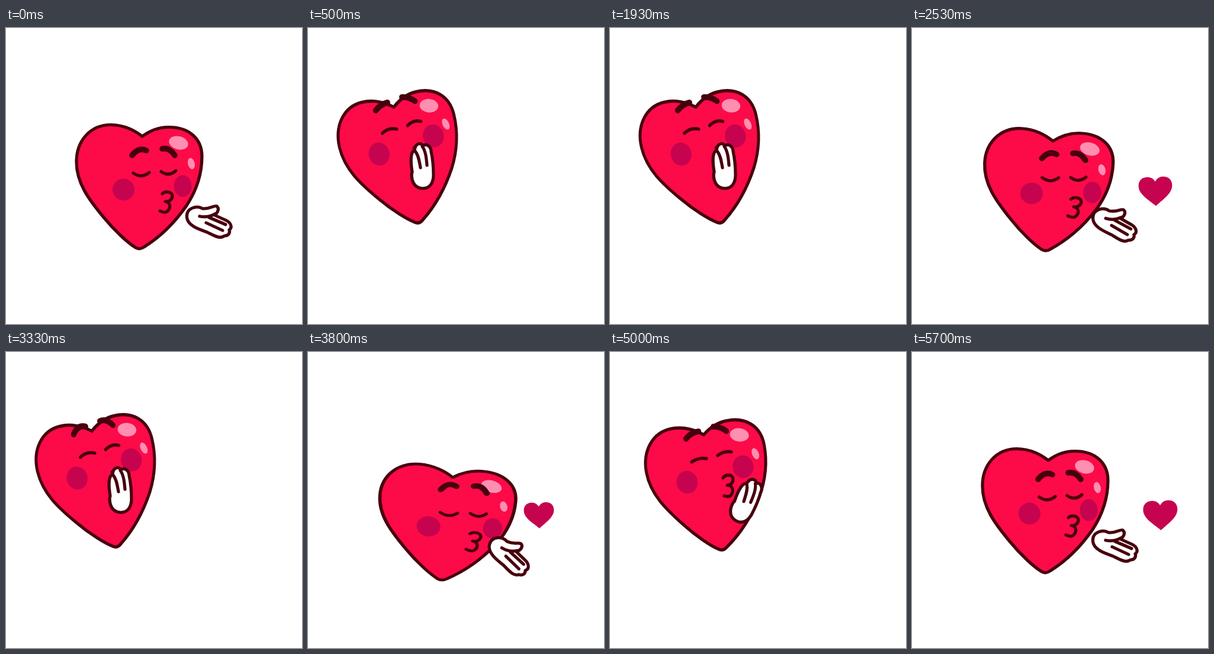
An HTML page with a canvas for the animation above (5.73 s loop, 500x500 px).

```html
<!DOCTYPE html>
<html lang="en">
<head>
<meta charset="utf-8">
<title>Heart blowing kisses</title>
<style>
html, body { margin: 0; width: 100%; height: 100%; overflow: hidden; background: #fff; }
canvas { display: block; width: 500px; height: 500px; }
</style>
</head>
<body>
<canvas id="stage" width="500" height="500"></canvas>
<script>
const ctx = document.getElementById('stage').getContext('2d');
const LOOP = 5730, CYCLE = 36;
const RED = '#fd0a49', DARK = '#47000d', PINK = '#ff8fb1', BERRY = '#c5034f';
const RAD = Math.PI / 180, LINE = 5.2;

// Steps of one cycle: the throw begins, lands, and the kiss leaves the hand.
const THROW = 15, LAND = 20.5, SETTLED = 32, RELEASE = 19;

const BODY = new Path2D('M230 183C219 174 200 163.5 177 163.5C142 163.5 119 191 119 226C119 262 140 290 166 321C184 343 206 363 219 371Q226 375 233 370C262 352 287 326 305 300C322 274 331 247 331 217C331 186 308 167 274 167.5C255 167.5 241 175 230 183Z');
const LIPS = new Path2D('M264 280C269 275 282 276 281 285C280 291 274 294 269 293C277 294 279 302 274 308C271 313 264 311 260 309');
const KISS = new Path2D('M0-17C-4-24-10-25-14-25C-23-25-29-19-29-10C-29 4-14 13 0 25C14 13 29 4 29-10C29-19 23-25 14-25C10-25 4-24 0-17Z');
const OPEN = new Path2D('M332 305C322 299 304 304 305.500 320C307 334 326 340 340 345C352 351 362 357 369 351C376 351 379 346 377 341C383 337 380 329 372 325L352 316C358 312 361 305 356 301C351 299 346 306 332 305Z');
const OPEN_LINES = new Path2D('M353 314C346 318 336 320 327 318M343 320L371 332M338 329L366 342');
const SHUT = new Path2D('M176 243C173 225 173 209 180 207C181 194 191 193 194 199C201 194 208 201 208 209C211 222 212 236 212 250C211 264 204 271 194 271C183 271 175 263 175 247Z');
const SHUT_LINES = new Path2D('M181 208C187 215 188 226 190 236M193 200C199 208 200 221 201 232');

const clamp = u => Math.min(Math.max(u, 0), 1);
const mix = (a, b, u) => a + (b - a) * u;
const part = (k, from, to) => clamp((k - from) / (to - from));
const ease = (k, from, to) => {
  const u = part(k, from, to);
  return u * u * (3 - 2 * u);
};

// How far each part has gone to the kissing pose, and the force of the landing.
function stateAt(k) {
  const swing = part(k, THROW, LAND);
  const thrown = swing ** 2.5, handBack = swing ** 1.5;
  return {
    lean: ease(k, .5, 5) * (1 - thrown),
    turn: ease(k, 1.5, 9) * (1 - thrown),
    press: ease(k, 11, 12) * (1 - thrown),
    reach: ease(k, 0, 4.5) * (1 - handBack),
    twist: ease(k, 0, 7.5) * (1 - handBack),
    force: thrown * (1 - part(k, LAND, SETTLED)) ** 2.2
  };
}

function stroke(path, width) {
  ctx.lineWidth = width;
  ctx.strokeStyle = DARK;
  ctx.stroke(path);
}

function curve(x1, y1, cx, cy, x2, y2, width) {
  const p = new Path2D();
  p.moveTo(x1, y1);
  p.quadraticCurveTo(cx, cy, x2, y2);
  stroke(p, width);
}

function oval(x, y, rx, ry, turn, color) {
  ctx.fillStyle = color;
  ctx.beginPath();
  ctx.ellipse(x, y, rx, ry, turn * RAD, 0, 2 * Math.PI);
  ctx.fill();
}

function drawBody({ lean, turn, press, force }) {
  const swell = Math.sqrt(force);
  const squash = .14 * force - .0525 * turn;
  const fx = -16 * turn, fy = 5 * swell - 25.5 * turn;
  const sag = 10 - 17 * turn, arch = 1 - .6 * press + .5 * force;

  ctx.save();
  ctx.translate(mix(226, 188.5, lean), mix(375, 331, lean) + 21 * force);
  ctx.rotate((6 * swell - 13.5 * turn) * RAD);
  ctx.scale(1 + squash, 1 - squash);
  ctx.translate(-226, -375);

  ctx.fillStyle = RED;
  ctx.fill(BODY);
  stroke(BODY, LINE);
  oval(291.5, 194, 16.5, 11, 15, PINK);
  oval(313, 229, 5.8, 9.6, -14, PINK);

  oval(198.5 + fx * .85, 273 + fy * .87, 18.5, 18.5, 0, BERRY);
  oval(298.5 + fx * .75, 267 + fy * .95, 15 + 3.5 * turn, 18.5, 0, BERRY);

  ctx.translate(fx, fy);
  curve(215, 245, 229, 245 + sag, 242, 244, LINE);
  curve(262, 242.5, 275, 242 + sag, 287, 241, LINE);
  stroke(LIPS, LINE);

  ctx.translate(0, -8 * turn - 20 * force);
  curve(213, 215, 224, 211 - 10 * arch, 237, 207, 9.5);
  curve(264, 204, 276, 208.5 - 7 * arch, 285, 215, 9.5);
  ctx.restore();
}

function drawHand({ reach, twist, force }) {
  const shut = twist > .5;
  const angle = 33 * force - 115 * twist;
  ctx.save();
  ctx.translate(mix(322, 194, reach), mix(320, 252, reach) + 19 * force);
  if (!shut) ctx.scale(1, 1 - 1.4 * twist * (1 - twist));
  ctx.rotate((shut ? angle + 115 : angle) * RAD);
  ctx.translate(shut ? -194 : -322, shut ? -252 : -320);
  ctx.fillStyle = '#fff';
  ctx.fill(shut ? SHUT : OPEN);
  stroke(shut ? SHUT : OPEN, LINE);
  stroke(shut ? SHUT_LINES : OPEN_LINES, LINE);
  ctx.restore();
}

function drawKiss(k) {
  if (k < RELEASE) return;
  const left = Math.exp(-.29 * (k - RELEASE));
  const size = 1 - .7 * left ** 1.5;
  ctx.save();
  ctx.translate(421 - 98 * left, 276);
  ctx.rotate(-2 * RAD);
  ctx.scale(size, size);
  ctx.fillStyle = BERRY;
  ctx.fill(KISS);
  ctx.restore();
}

// Five poses in every 200 ms; the first one stays longer.
function poseAt(t) {
  const rest = t % 200;
  return 5 * Math.floor(t / 200) + [70, 100, 130, 170].filter(s => rest >= s).length;
}

function draw(t) {
  const k = poseAt(t % LOOP) % CYCLE;
  const state = stateAt(k);
  ctx.fillStyle = '#fff';
  ctx.fillRect(0, 0, 500, 500);
  ctx.lineCap = ctx.lineJoin = 'round';
  drawKiss(k);
  drawBody(state);
  drawHand(state);
}

const start = performance.now();
function tick() {
  draw(performance.now() - start);
  requestAnimationFrame(tick);
}
tick();
</script>
</body>
</html>
```
